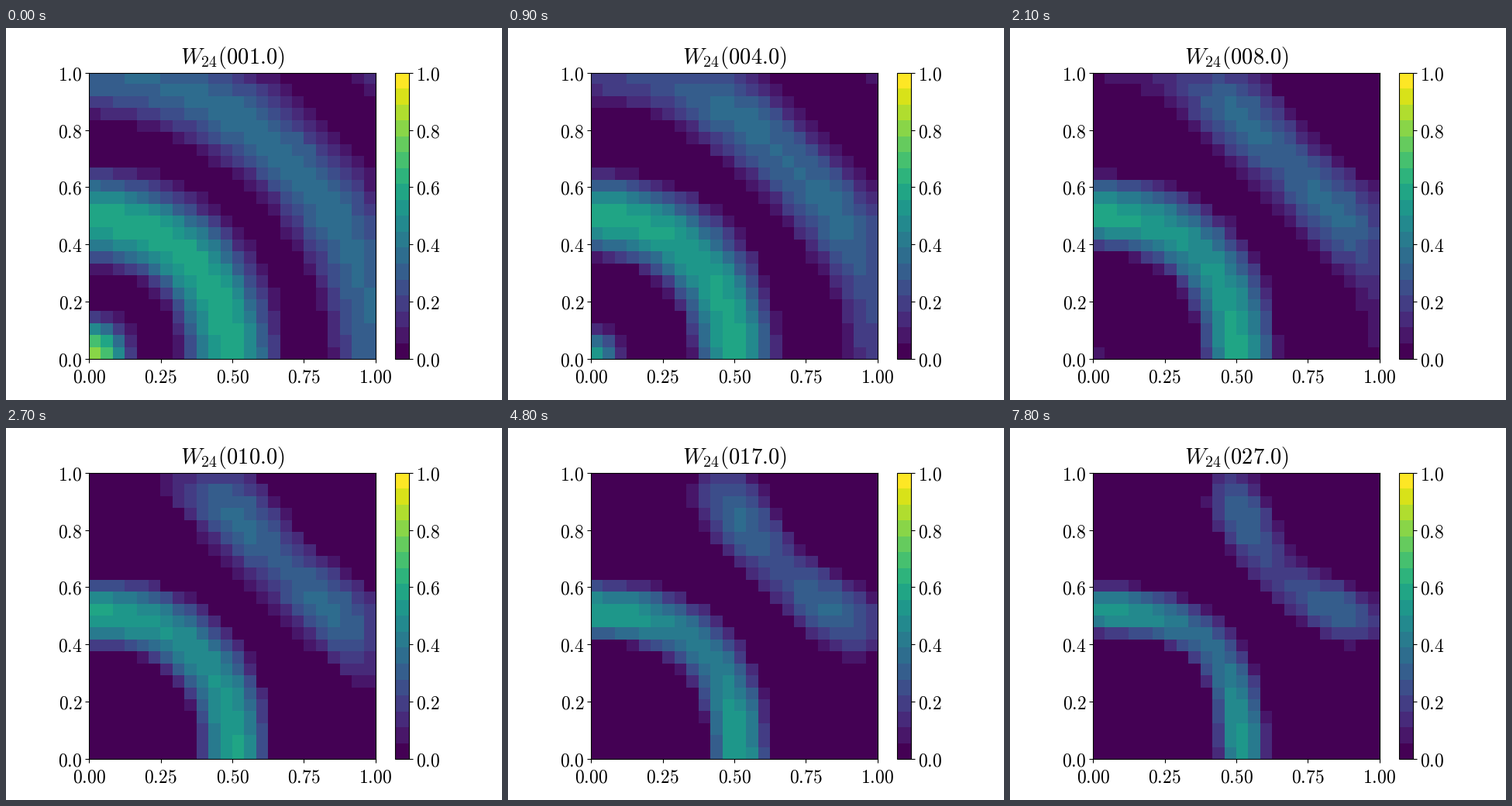
A matplotlib script for the animation above (8000 ms loop, 640x480 px).

```python
import numpy as np
import matplotlib.pyplot as plt
from matplotlib.animation import FuncAnimation

plt.rcParams["mathtext.fontset"] = "cm"

WIDTH, HEIGHT, DPI = 640, 480, 100
N = 24
INTERVAL, FRAMES, HOLD = 100, 80, 3

# Damped rings sampled at the cell centres
c = (np.arange(N) + 0.5) / N
x, y = np.meshgrid(c, c)
r = np.hypot(x, y)
start = np.exp(-r) * np.cos(2 * np.pi * r) ** 2


def radius(u, v, p=3.3):
    return (u**p + v**p) ** (1 / p)


# Cells decay faster the further they lie from two lasting ridges
inner = 1.35 * (radius(x, y) - 0.54) ** 2
outer = 0.75 * (radius(1 - x, 1 - y) - 0.48) ** 2
limit = 0.11 * np.exp(-1.1 * r**2)
rate = limit * (1 - np.exp(-np.minimum(inner, outer) / limit)) + 0.0013


def kernel(step):
    return np.clip(start - step * rate, 0, 1)


def place(left, bottom, width, height):
    return fig.add_axes([left / WIDTH, bottom / HEIGHT, width / WIDTH, height / HEIGHT])


def labels(values, digits):
    return [f"${v:.{digits}f}$" for v in values]


fig = plt.figure(figsize=(WIDTH / DPI, HEIGHT / DPI), dpi=DPI, facecolor="white")
ax = place(107.2, 52.8, 369.6, 369.6)
cax = place(501.6, 52.8, 18.48, 369.6)

image = ax.imshow(kernel(1), cmap=plt.get_cmap("viridis", 18), vmin=0, vmax=1,
                  origin="lower", extent=(0, 1, 0, 1), interpolation="nearest",
                  aspect="auto")
quarters, fifths = np.linspace(0, 1, 5), np.linspace(0, 1, 6)
ax.set_xticks(quarters, labels(quarters, 2))
ax.set_yticks(fifths, labels(fifths, 1))
bar = fig.colorbar(image, cax=cax)
bar.set_ticks(fifths, labels=labels(fifths, 1))
for a in (ax, cax):
    a.tick_params(axis="y", labelsize=17, pad=2.7)
ax.tick_params(axis="x", labelsize=17, pad=4.5)
title = ax.set_title("", fontsize=20.5, pad=8.3)


def update(frame):
    step = 1 + frame // HOLD
    image.set_data(kernel(step))
    title.set_text(f"$W_{{24}}({step:05.1f})$")
    return image, title


anim = FuncAnimation(fig, update, frames=FRAMES, interval=INTERVAL,
                     repeat=True, repeat_delay=0, blit=False)
plt.show()
```
